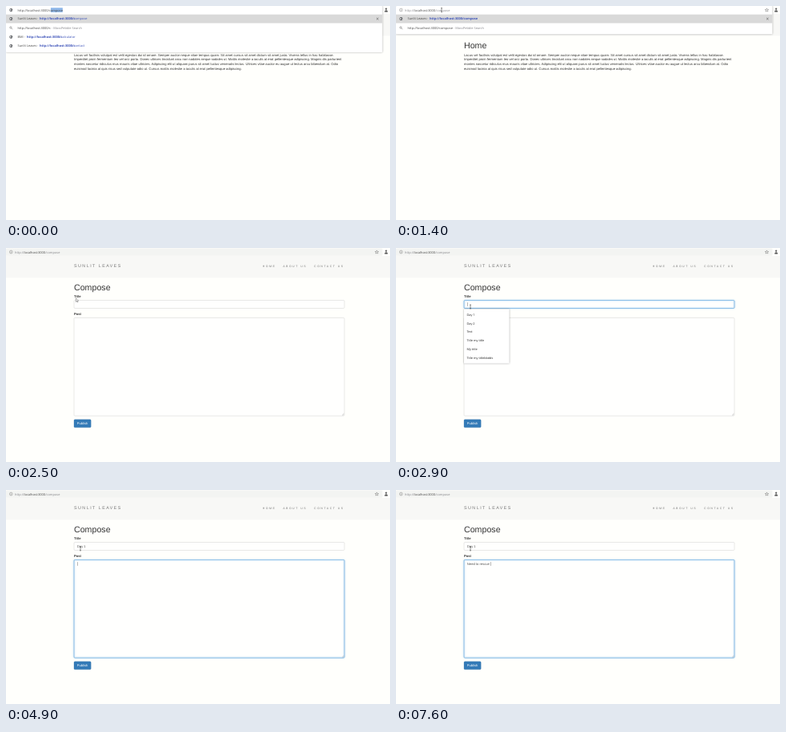
An HTML page that plays this animation: 480 by 268 pixels, repeating every 8000 ms.

```html
<!DOCTYPE html>
<html lang="en">
<head>
<meta charset="utf-8">
<title>Compose</title>
<style>
  html, body { margin: 0; width: 100%; height: 100%; overflow: hidden; background: #fffffc; }
  svg { display: block; width: 480px; height: 268px; }
  text { font: 4.15px "Liberation Sans", Arial, sans-serif; fill: #333; white-space: pre; text-rendering: geometricPrecision; }
  .ui text { font: 3.95px "Open Sans", sans-serif; fill: #444; }
  .ui .link { fill: #3a50b8; }
  .ui .bold { font-weight: 700; }
  .ui .dim { fill: #85858a; }
  #list text { font-size: 3.8px; fill: #222; }
  .nav { font-size: 3.56px; letter-spacing: 1.48px; fill: #777; }
  .brand { font-size: 5.34px; letter-spacing: 1.48px; fill: #777; }
  .h1 { font-size: 10.67px; }
  .label { font-weight: 700; }
  .value { fill: #555; }
  .field { fill: #fffffe; stroke: #c4c4c4; stroke-width: .4; }
  .glow { fill: none; stroke: #66afe9; stroke-width: .65; filter: drop-shadow(0 0 .8px rgba(102, 175, 233, .8)); }
  .caret { fill: #333; }
  .panel { fill: #fff; filter: drop-shadow(0 .6px .9px rgba(0, 0, 0, .35)); }
</style>
</head>
<body>
<svg viewBox="0 0 480 268">
  <defs>
    <g id="globe">
      <circle r="2" fill="#55585c"/>
      <path d="M-1.5-.6Q-.4-1.5.3-.8T-.3.4L-.2 1.3Q-1.2.8-1.5-.6M.7.2L1.5-.2Q1.4.9.6 1.2Z" fill="#e4e4e4"/>
    </g>
    <g id="lens" fill="none" stroke="#666" stroke-width=".5">
      <circle cx="-.4" cy="-.4" r="1.2"/><path d="M.5.5L1.9 1.9"/>
    </g>
  </defs>

  <rect width="480" height="268" fill="#fffffc"/>
  <rect y="10" width="480" height="27.3" fill="#f8f8f6"/>
  <text class="brand" x="85" y="24.4">SUNLIT LEAVES</text>
  <text class="nav" x="320.7" y="23.8">HOME</text>
  <text class="nav" x="346.2" y="23.8">ABOUT US</text>
  <text class="nav" x="385.1" y="23.8">CONTACT US</text>

  <g id="home">
    <text class="h1" x="85" y="52.9">Home</text>
    <text x="85" y="62.5">Lacus vel facilisis volutpat est velit egestas dui id ornare. Semper auctor neque vitae tempus quam. Sit amet cursus sit amet dictum sit amet justo. Viverra tellus in hac habitasse.</text>
    <text x="85" y="68.4">Imperdiet proin fermentum leo vel orci porta. Donec ultrices tincidunt arcu non sodales neque sodales ut. Mattis molestie a iaculis at erat pellentesque adipiscing. Magnis dis parturient</text>
    <text x="85" y="74.4">montes nascetur ridiculus mus mauris vitae ultricies. Adipiscing elit ut aliquam purus sit amet luctus venenatis lectus. Ultrices vitae auctor eu augue ut lectus arcu bibendum at. Odio</text>
    <text x="85" y="80.3">euismod lacinia at quis risus sed vulputate odio ut. Cursus mattis molestie a iaculis at erat pellentesque adipiscing.</text>
  </g>

  <g id="compose">
    <text class="h1" x="85" y="52.9">Compose</text>
    <text class="label" x="85" y="62.4">Title</text>
    <rect class="field" x="85" y="65.5" width="338" height="10" rx="1.2"/>
    <rect class="glow" id="titleGlow" x="85" y="65.5" width="338" height="10" rx="1.2"/>
    <text class="value" id="title" x="88.85" y="72"></text>
    <rect class="caret" id="titleCaret" y="68.2" width=".35" height="4.7"/>
    <text class="label" x="85" y="84.4">Post</text>
    <rect class="field" x="85" y="87.4" width="338" height="122.8" rx="1.2"/>
    <rect class="glow" id="postGlow" x="85" y="87.4" width="338" height="122.8" rx="1.2"/>
    <path d="M420.2 209.4L422.3 207.3M421.4 209.4L422.3 208.5" stroke="#777" stroke-width=".35"/>
    <text class="value" id="post" x="88.85" y="94"></text>
    <rect class="caret" id="postCaret" y="90.2" width=".35" height="4.7"/>
    <rect x="85" y="214.8" width="21.2" height="10" rx="1.2" fill="#337ab7" stroke="#2e6da4" stroke-width=".3"/>
    <text x="88.8" y="221.4" style="fill:#fff">Publish</text>
  </g>

  <g class="ui" id="list"></g>

  <g class="ui">
    <rect width="480" height="10" fill="#fffffd"/>
    <rect id="bar" y=".4" width="470.5" height="9.4" rx="1"/>
    <g fill="#555"><circle cx="475.2" cy="3.7" r="1.1"/><path d="M473.3 7.4V6.2Q475.2 4.2 477.1 6.2V7.4Z"/></g>
    <g id="drop"></g>
    <use href="#globe" id="siteIcon" x="6.3" y="5"/>
    <g id="idle">
      <circle cx="6.3" cy="5" r="1.9" fill="none" stroke="#666" stroke-width=".4"/>
      <path d="M6.3 4.7V6.1M6.3 3.8V4.2" stroke="#666" stroke-width=".45"/>
      <path d="M463.5 2.9L464.1 4.4L465.7 4.5L464.5 5.5L464.9 7L463.5 6.2L462.1 7L462.5 5.5L461.3 4.5L462.9 4.4Z" fill="none" stroke="#555" stroke-width=".4"/>
    </g>
    <rect id="pick" y="2.2" height="5.6" fill="#8fb8ea"/>
    <text id="url" y="6.5"></text>
    <rect class="caret" id="urlCaret" y="2.4" width=".35" height="5.2"/>
  </g>

  <path id="beam" d="M-1-2.6Q0-2.6 0-2V2Q0 2.6-1 2.6M1-2.6Q0-2.6 0-2M0 2Q0 2.6 1 2.6" fill="none" stroke="#222" stroke-width=".5"/>
  <path id="arrow" d="M0 0V4.6L1.1 3.6L1.9 5.2L2.6 4.9L1.9 3.3H3.3Z" fill="#fff" stroke="#222" stroke-width=".35"/>
</svg>
<script>
const $ = id => document.getElementById(id);
const HOST = "http://localhost:3000/";
const SITE = "Sunlit Leaves";
const show = (id, on) => { $(id).style.display = on ? "" : "none"; };
const clamp = v => Math.max(0, Math.min(1, v));

// Latest value whose start time has passed
const at = (track, t) => track.reduce((v, [start, next]) => t >= start ? next : v, track[0][1]);

const pathTyped = [[0, "c"], [100, "co"], [300, "com"], [400, "comp"], [600, "compo"], [700, "compos"], [900, "compose"]];
const titleTyped = [[0, ""], [3300, "D"], [3600, "Da"], [3800, "Day"], [3900, "Day "], [4200, "Day 1"]];
const postTyped = [[0, ""], [5300, "N"], [5600, "Ne"], [5800, "Nee"], [5900, "Need"], [6000, "Need "], [6200, "Need t"],
  [6300, "Need to"], [6400, "Need to "], [6500, "Need to re"], [6700, "Need to res"], [7100, "Need to resc"],
  [7200, "Need to rescu"], [7500, "Need to rescue"], [7600, "Need to rescue "]];
const hints = [
  [0, []],
  [2800, ["Day 1", "Day 2", "Test", "Title my title", "My title", "Title my titlebbdds"]],
  [3300, ["Day 1", "Day 2", "Day 101", "Day 3", "Dd"]],
  [4200, ["Day 1", "Day 101"]],
  [4700, []]
];
const pages = [[SITE, "compose", 42], ["BMI", "calculator", 26], [SITE, "contact", 42]];

function pageRow([name, path, x], y, typed) {
  return `<use href="#globe" x="6.3" y="${y}"/><text x="14.5" y="${y + 1.4}">${name}</text>` +
    `<text x="${x - 3}" y="${y + 1.4}">-</text><text class="link" x="${x}" y="${y + 1.4}">` +
    `<tspan class="bold">${HOST + typed}</tspan>${path.slice(typed.length)}</text>`;
}

function dropdown(typed) {
  const [first, ...rest] = pages.filter(p => p[1].startsWith(typed));
  const rowY = i => 16 + i * 11.35;
  return `<rect class="panel" y="0" width="470.5" height="${rowY(rest.length + 1) + 8}" rx="1"/>` +
    `<rect y="10.6" width="470.5" height="10.9" fill="#d9d9d9"/>` +
    pageRow(first, rowY(0), typed) +
    `<path d="M463.2 14.8L465.6 17.2M465.6 14.8L463.2 17.2" stroke="#333" stroke-width=".5"/>` +
    `<use href="#lens" x="6.3" y="${rowY(1)}"/><text x="14.5" y="${rowY(1) + 1.4}">${HOST + typed}` +
    `<tspan class="dim"> - MossPebble Search</tspan></text>` +
    rest.map((p, i) => pageRow(p, rowY(i + 2), typed)).join("");
}

function hintList(items) {
  if (!items.length) return "";
  return `<rect class="panel" x="85" y="76.4" width="56.6" height="${items.length * 10.7 + 4}" rx=".6"/>` +
    items.map((s, i) => `<text x="88.5" y="${85 + i * 10.7}">${s}</text>`).join("");
}

// Rebuild markup only when it differs
const cache = {};
function fill(id, html) {
  if (cache[id] !== html) $(id).innerHTML = cache[id] = html;
}

function field(id, text, focused, glow) {
  fill(id, text);
  show(id + "Caret", focused);
  $(id + "Caret").setAttribute("x", 89 + (text ? $(id).getComputedTextLength() : 0));
  $(id + "Glow").style.opacity = glow;
}

function addressBar(t) {
  const typed = at(pathTyped, t), editing = t < 1400;
  const x = editing ? 14.5 : 11;
  show("idle", !editing);
  show("siteIcon", editing);
  $("bar").setAttribute("fill", editing ? "#fff" : "#f3f4f2");
  $("url").setAttribute("x", x);
  fill("url", editing ? `${HOST}compose` : `<tspan class="dim">http://</tspan>localhost:3000<tspan class="dim">/compose</tspan>`);
  fill("drop", t < 1500 ? dropdown(typed) : "");
  const end = HOST.length + typed.length;
  const from = x + $("url").getSubStringLength(0, end);
  const width = x + $("url").getComputedTextLength() - from;
  $("pick").setAttribute("x", from);
  $("pick").setAttribute("width", Math.max(0, width));
  show("pick", editing && typed !== "compose");
  $("urlCaret").setAttribute("x", from);
  show("urlCaret", editing && typed === "compose");
}

function mouse(t) {
  const k = clamp((Math.floor(t / 100) * 100 - 2200) / 400);
  const e = k * k * (3 - 2 * k);
  const place = `translate(${57 + 36 * e} ${5 + 68.5 * e})`;
  const moving = k > 0 && k < 1;
  $("beam").setAttribute("transform", place);
  $("arrow").setAttribute("transform", place);
  show("beam", t >= 1400 && !moving);
  show("arrow", moving);
}

function draw(t) {
  show("home", t < 1500);
  show("compose", t >= 1500);
  addressBar(t);
  const leave = clamp((t - 4700) / 150);
  field("title", at(titleTyped, t), t >= 2700 && t < 4700, clamp((t - 2650) / 150) - leave);
  field("post", at(postTyped, t), t >= 4700, leave);
  fill("list", hintList(at(hints, t)));
  mouse(t);
}

function tick() {
  draw(performance.now() % 8000);
  requestAnimationFrame(tick);
}
tick();
</script>
</body>
</html>
```
